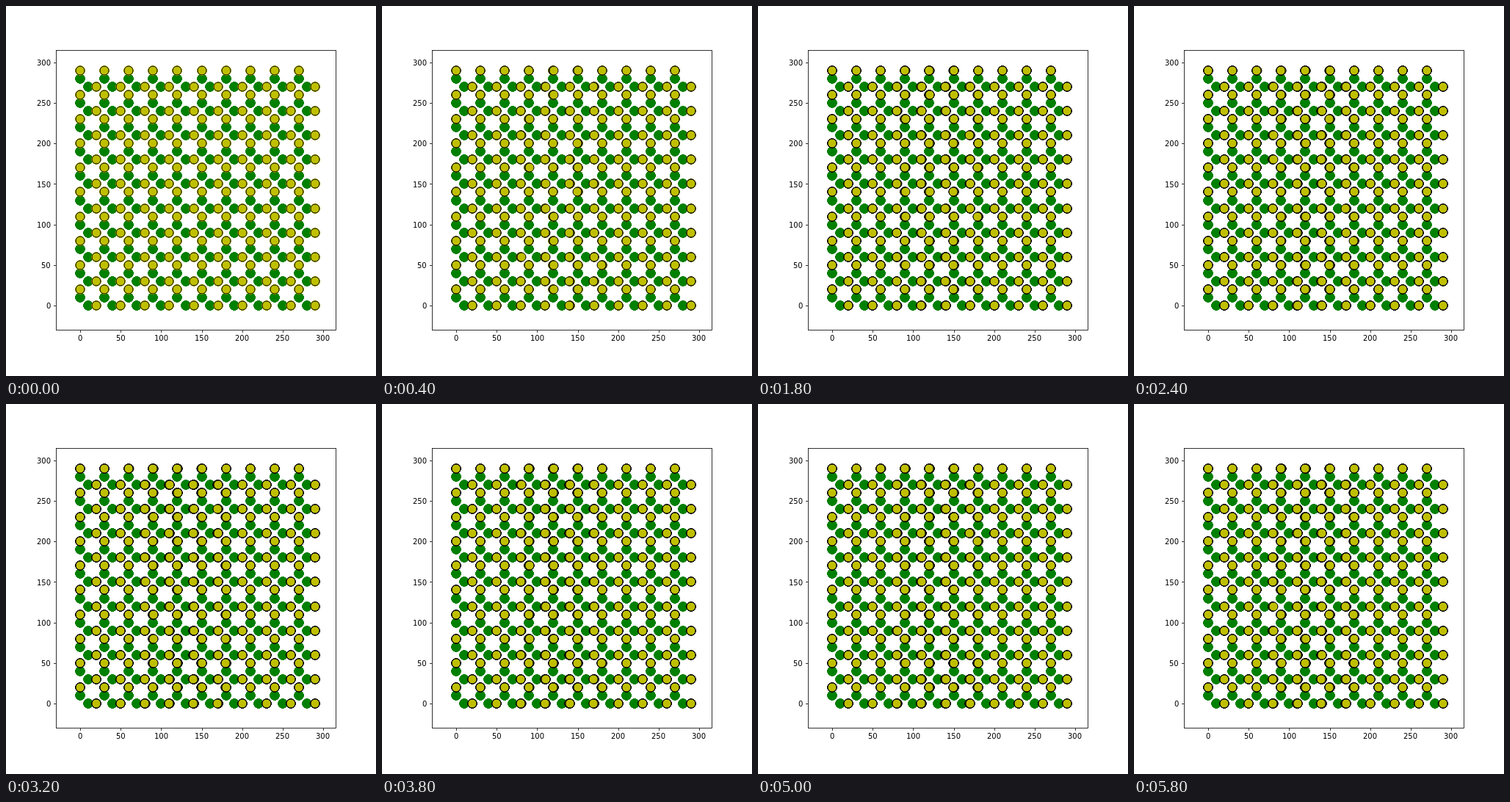
An HTML page with a canvas that plays this animation: 504x504 px, repeating every 6000 ms.

```html
<!DOCTYPE html>
<html lang="en">
<head>
<meta charset="utf-8">
<style>
html, body { margin: 0; width: 100%; height: 100%; overflow: hidden; background: #fff; }
canvas { display: block; width: 504px; height: 504px; }
</style>
</head>
<body>
<canvas id="plot" width="504" height="504"></canvas>
<script>
const ctx = document.getElementById('plot').getContext('2d');
const STEP = 200, STEPS = 30, JITTER = 0.2;
const GREEN = '#008000', YELLOW = '#bfbf00';
const SCALE = 380.52 / 345;
const px = v => 68.04 + (v + 30) * SCALE;
const py = v => 441 - (v + 30) * SCALE;

// Two sublattices, each with vertical and horizontal bonds
function lattice(offset) {
  const sites = [];
  for (let i = 0; i < 10; i++)
    for (let j = 0; j < 10; j++)
      sites.push([30 * i, 30 * j + offset], [30 * i + offset, 30 * j]);
  return sites.map(([x, y]) => [px(x), py(y)]);
}
const greens = lattice(10), yellows = lattice(20);

// Repeatable pseudo-random number in -1..1
function noise(a, b) {
  let h = Math.imul(a + 1, 0x9E3779B1) ^ Math.imul(b + 7, 0x85EBCA6B);
  h = Math.imul(h ^ h >>> 15, 0x2C1B3C6D);
  h = Math.imul(h ^ h >>> 13, 0x297A2D39);
  return ((h ^ h >>> 16) >>> 0) / 2 ** 31 - 1;
}

// Marker centres snap to whole pixels; repeated plotting hardens the edges
function markers(sites, face, edge, times = 1) {
  const path = new Path2D();
  for (const [x, y] of sites) {
    const cx = Math.round(x), cy = Math.round(y);
    path.moveTo(cx + 6, cy);
    path.arc(cx, cy, 6, 0, 2 * Math.PI);
  }
  ctx.fillStyle = face;
  ctx.strokeStyle = edge;
  ctx.lineWidth = 1;
  while (times--) {
    ctx.fill(path);
    ctx.stroke(path);
  }
}

function label(v, x, y) {
  ctx.fillText(v, Math.round(x), Math.round(y));
}

function axes() {
  ctx.strokeStyle = ctx.fillStyle = '#000';
  ctx.lineWidth = 0.8;
  ctx.font = '10px "DejaVu Sans", sans-serif';
  ctx.strokeRect(68.5, 60.5, 381, 381);
  ctx.beginPath();
  for (let v = 0; v <= 300; v += 50) {
    const x = Math.round(px(v)) + 0.5, y = Math.round(py(v)) + 0.5;
    const w = ctx.measureText(v).width;
    ctx.moveTo(x, 442);
    ctx.lineTo(x, 445);
    ctx.moveTo(68, y);
    ctx.lineTo(65, y);
    label(v, px(v) - w / 2, 456);
    label(v, 61.04 - w, py(v) + 4.1);
  }
  ctx.stroke();
}

function reset() {
  ctx.fillStyle = '#fff';
  ctx.fillRect(0, 0, 504, 504);
  axes();
  markers(greens, GREEN, GREEN, 20);
  markers(yellows, YELLOW, YELLOW, 20);
}

// Every step plots over the earlier ones
function advance(step) {
  const amp = step ? JITTER : 0;
  const moved = yellows.map(([x, y], i) => [x + amp * noise(i, step), y]);
  markers(moved, YELLOW, '#000');
}

let shown = STEPS;
const start = performance.now();
function tick() {
  const step = Math.floor((performance.now() - start) / STEP) % STEPS;
  if (step < shown) {
    reset();
    shown = -1;
  }
  while (shown < step) advance(++shown);
  requestAnimationFrame(tick);
}
tick();
</script>
</body>
</html>
```
